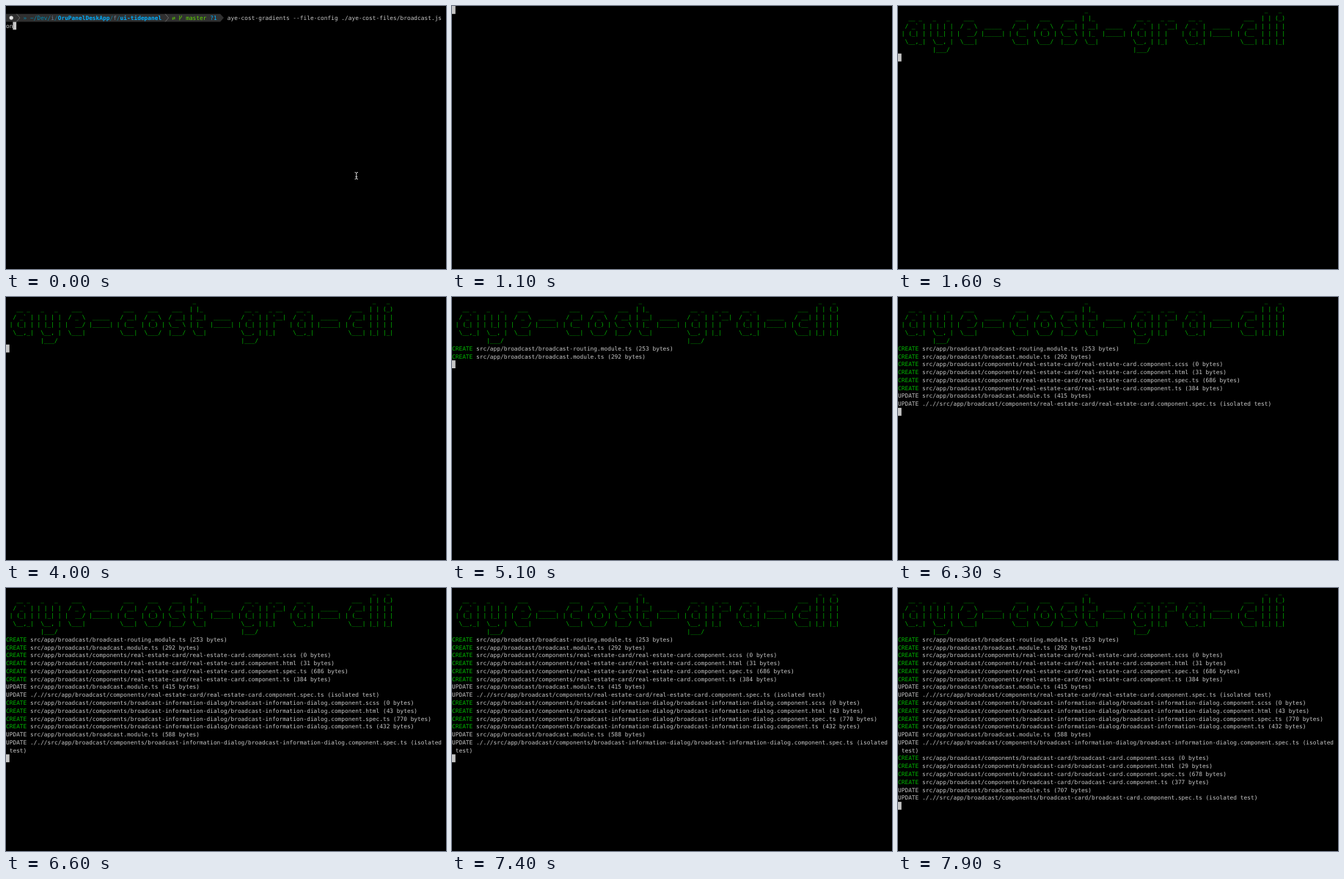
Animation of 600 by 358 pixels, one loop 8000 ms. Source, as an HTML page:

```html
<!DOCTYPE html>
<html lang="en">
<head>
<meta charset="utf-8">
<title>Terminal session</title>
<style>
  html, body { margin: 0; width: 100%; height: 100%; overflow: hidden; background: #000; }
  #stage { position: relative; width: 600px; height: 358px; overflow: hidden; }

  /* Laid out at ten times the size so that the character grid keeps its fractions. */
  #screen {
    --row-height: 107.8px;
    position: absolute; left: 0; top: -0.2px; width: 6200px; height: 3600px;
    transform: scale(.1); transform-origin: 0 0;
    font: 78.32px "DejaVu Sans Mono", "Liberation Mono", monospace;
    line-height: var(--row-height);
    text-rendering: geometricPrecision; font-variant-ligatures: none;
    color: #c7c7c7;
  }
  pre, #cursor { position: absolute; left: 0; margin: 0; top: calc(var(--row) * var(--row-height)); }
  pre { font: inherit; }
  svg { position: absolute; left: 0; top: 0; }

  .create, #banner { color: #00bc00; }
  .dir { color: #0087af; }
  .short { color: #6f7f95; }
  .anchor { color: #00afff; font-weight: bold; }
  .git { color: #5fd700; }
  .new { color: #00afff; }

  #cursor { width: 47.15px; height: var(--row-height); background: #c7c7c7; animation: cursor 8s step-end infinite; }
  .prompt { animation: prompt 8s step-end infinite; }
  #banner { animation: banner 8s step-end infinite; }
  #log0 { animation: log0 8s step-end infinite; }
  #log1 { animation: log1 8s step-end infinite; }
  #log2 { animation: log2 8s step-end infinite; }
  #log3 { animation: log3 8s step-end infinite; }

  @keyframes prompt { 0% { visibility: visible } 13.75%, 100% { visibility: hidden } }
  @keyframes banner { 0% { visibility: hidden } 20%, 100% { visibility: visible } }
  @keyframes log0 { 0% { visibility: hidden } 53.75%, 100% { visibility: visible } }
  @keyframes log1 { 0% { visibility: hidden } 67.5%, 100% { visibility: visible } }
  @keyframes log2 { 0% { visibility: hidden } 82.5%, 100% { visibility: visible } }
  @keyframes log3 { 0% { visibility: hidden } 96.25%, 100% { visibility: visible } }
  @keyframes cursor {
    0% { --row: 2; left: 94.3px }
    12.5% { --row: 3; left: 0 }
    13.75% { --row: 0; left: 0 }
    20% { --row: 6; left: 0 }
    53.75% { --row: 8; left: 0 }
    67.5% { --row: 14; left: 0 }
    82.5% { --row: 21; left: 0 }
    96.25%, 100% { --row: 27; left: 0 }
  }
</style>
</head>
<body>
<div id="stage">
  <svg class="prompt" width="600" height="358" fill="none">
    <path d="M0 10.8H292.2L297 16.1L292.2 21.4H0Z" fill="#303030"/>
    <path d="M14.4 10.8L18.8 16.1L14.4 21.4M217.2 10.8L221.6 16.1L217.2 21.4" stroke="#8a8a8a" stroke-width=".6"/>
    <circle cx="7.2" cy="16.1" r="2.6" fill="#e4e4e4"/>
    <path d="M236.8 13V19.4M239.4 13V14.6Q239.4 16 236.8 17" stroke="#5fd700" stroke-width=".8"/>
    <path d="M475.6 226.4Q477.8 226.4 477.8 228V234Q477.8 235.8 475.6 235.8M480 226.4Q477.8 226.4 477.8 228M477.8 234Q477.8 235.8 480 235.8M476.4 232.4H479.2" stroke="#d0d0d0"/>
  </svg>
  <div id="screen">
    <pre class="prompt" style="--row:1"><span class="dir">     » ~/Dev/</span><span class="short">i</span><span class="dir">/</span><span class="anchor">OruPanelDeskApp</span><span class="dir">/</span><span class="short">f</span><span class="dir">/</span><span class="anchor">ui-tidepanel</span><span class="git">   ⇄   master</span><span class="new"> ?1</span>   aye-cost-gradients --file-config ./aye-cost-files/broadcast.js
on</pre>
    <pre id="banner" style="--row:0"></pre>
    <pre id="log0" style="--row:6"></pre>
    <pre id="log1" style="--row:8"></pre>
    <pre id="log2" style="--row:14"></pre>
    <pre id="log3" style="--row:21"></pre>
    <div id="cursor"></div>
  </div>
</div>
<script>
  const COLUMNS = 126;
  const BASE = "src/app/broadcast/";

  // Six rows per letter, separated by "~".
  const LETTERS = {
    a: "~   __ _ ~  / _` |~ | (_| |~  \\__,_|~",
    c: "~   ___ ~  / __|~ | (__ ~  \\___|~",
    e: "~   ___ ~  / _ \\~ |  __/~  \\___|~",
    g: "~   __ _ ~  / _` |~ | (_| |~  \\__, |~  |___/ ",
    i: "  _ ~ (_)~ | |~ | |~ |_|~",
    l: "  _ ~ | |~ | |~ | |~ |_|~",
    o: "~   ___  ~  / _ \\ ~ | (_) |~  \\___/ ~",
    r: "~  _ __ ~ | '__|~ | |   ~ |_|   ~",
    s: "~  ___ ~ / __|~ \\__ \\~ |___/~",
    t: "  _   ~ | |_ ~ | __|~ | |_ ~  \\__|~",
    y: "~  _   _ ~ | | | |~ | |_| |~  \\__, |~  |___/ ",
    "-": "~~  _____ ~ |_____|~~"
  };

  function bigText(text) {
    const rows = Array(6).fill("");
    for (const letter of text) {
      const parts = LETTERS[letter].split("~");
      const width = Math.max(...parts.map(part => part.length));
      parts.forEach((part, i) => rows[i] += part.padEnd(width));
    }
    return rows.join("\n");
  }

  const create = (file, bytes) => `CREATE ${BASE}${file} (${bytes} bytes)`;

  function component(name, [scss, html, spec, ts, module]) {
    const path = `components/${name}/${name}.component.`;
    return [
      create(path + "scss", scss),
      create(path + "html", html),
      create(path + "spec.ts", spec),
      create(path + "ts", ts),
      `UPDATE ${BASE}broadcast.module.ts (${module} bytes)`,
      `UPDATE ././/${BASE}${path}spec.ts (isolated test)`
    ];
  }

  const wrap = line => line.match(new RegExp(`.{1,${COLUMNS}}`, "g")).join("\n");

  const logs = [
    [create("broadcast-routing.module.ts", 253), create("broadcast.module.ts", 292)],
    component("real-estate-card", [0, 31, 686, 384, 415]),
    component("broadcast-information-dialog", [0, 43, 770, 432, 588]),
    component("broadcast-card", [0, 29, 678, 377, 707])
  ];

  document.getElementById("banner").textContent = bigText("aye-cost-gra-cli");
  logs.forEach((lines, i) => {
    document.getElementById("log" + i).innerHTML =
      lines.map(wrap).join("\n").replace(/CREATE/g, '<span class="create">CREATE</span>');
  });
</script>
</body>
</html>
```
